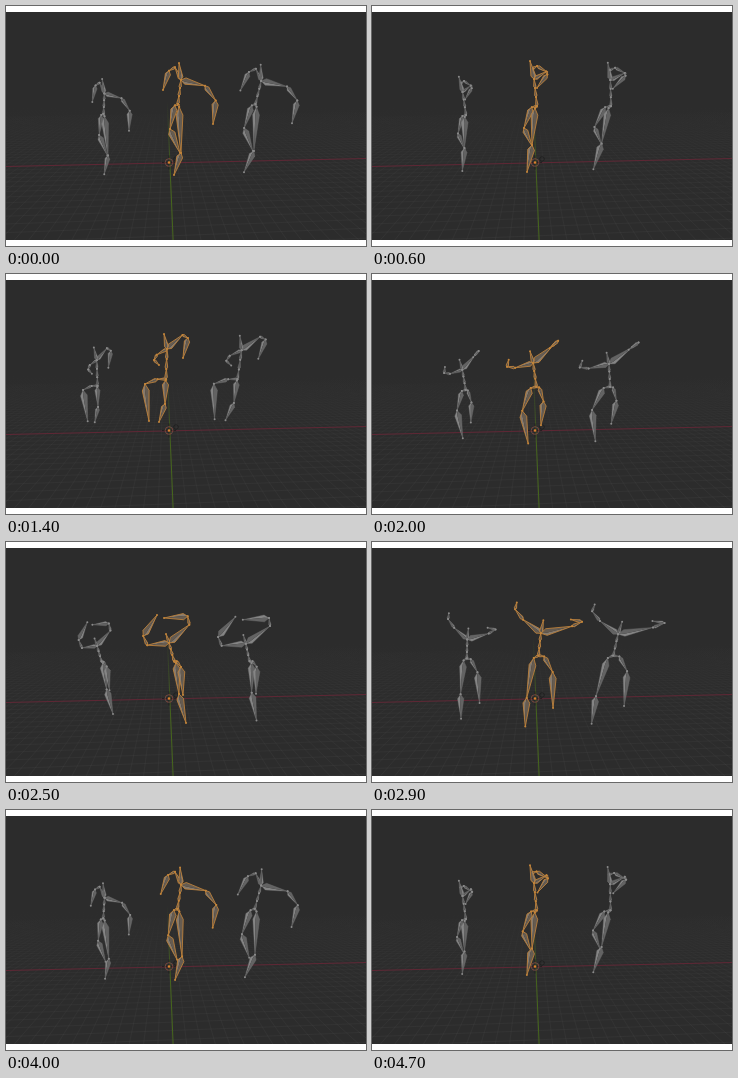
Animation, 360 px wide and 240 px high, one loop 4800 ms. Source, as an HTML page with a canvas:

```html
<!DOCTYPE html>
<html lang="en">
<head>
<meta charset="utf-8">
<title>Dancing armatures</title>
<style>
  html, body { margin: 0; width: 100%; height: 100%; overflow: hidden; background: #fff; }
  canvas { display: block; width: 360px; height: 240px; }
</style>
</head>
<body>
<canvas id="stage" width="360" height="240"></canvas>
<script>
const W = 360, H = 240, LOOP = 4800, STEP = 100, DANCE = 4050;
const ctx = document.getElementById('stage').getContext('2d');

// Key poses of one dancer. An arm is a bend handle and a hand, a leg a knee and a foot.
const poses = [
  { time: 0, pelvis: [172, 98], chest: [175, 74], head: [173, 57],
    arms: [[[166, 43], [157, 84]], [[221, 76], [207, 118]]],
    legs: [[[164, 123], [174, 147]], [[175, 147], [168, 169]]] },
  { time: 600, pelvis: [165, 100], chest: [162, 73], head: [158, 55],
    arms: [[[156, 51], [175, 66]], [[189, 54], [165, 82]]],
    legs: [[[152, 122], [160, 140]], [[160, 139], [155, 166]]] },
  { time: 1400, pelvis: [160, 105], chest: [161, 75], head: [158, 60],
    arms: [[[140, 84], [153, 91]], [[192, 41], [177, 84]]],
    legs: [[[139, 110], [143, 147]], [[159, 130], [153, 148]]] },
  { time: 2500, pelvis: [168, 119], chest: [163, 101], head: [160, 92],
    arms: [[[117, 113], [151, 73]], [[210, 66], [158, 76]]],
    legs: [[[173, 152], [180, 181]], [[175, 125], [177, 153]]] },
  { time: 3300, pelvis: [165, 108], chest: [177, 85], head: [188, 72],
    arms: [[[173, 51], [139, 56]], [[244, 102], [202, 117]]],
    legs: [[[130, 150], [121, 176]], [[183, 137], [181, 181]]] },
];

const GREY = { light: '#858585', dark: '#636363', edge: '#747474', joint: '#8a8a8a', width: 0.35 };
const ORANGE = { light: '#857a6e', dark: '#665c51', edge: '#c2843a', joint: '#c2843a', width: 0.85 };

// The same dance seen from three places on the floor.
const dancers = [
  { x: 95, y: 110, sway: 0.5, bob: 0.55, sx: 0.7, sy: 0.85, lean: 0.05, style: GREY },
  { x: 242, y: 102, sway: 1.5, bob: 1, sx: 1.1, sy: 0.96, lean: -0.1, style: GREY },
  { x: 167, y: 102, sway: 1, bob: 1, sx: 1, sy: 1, lean: 0, style: ORANGE },
];

const mix = (a, b, k) => a + (b - a) * k;
const mix2 = (a, b, k) => [mix(a[0], b[0], k), mix(a[1], b[1], k)];

// Swings a point around its root, the short way round.
function swing(rootA, a, rootB, b, root, k) {
  const ax = a[0] - rootA[0], ay = a[1] - rootA[1];
  const bx = b[0] - rootB[0], by = b[1] - rootB[1];
  const turn = Math.atan2(ax * by - ay * bx, ax * bx + ay * by);
  const angle = Math.atan2(ay, ax) + turn * k;
  const len = mix(Math.hypot(ax, ay), Math.hypot(bx, by), k);
  return [root[0] + len * Math.cos(angle), root[1] + len * Math.sin(angle)];
}

function bezier(a, c, b, t) {
  return mix2(mix2(a, c, t), mix2(c, b, t), t);
}

// Returns the pelvis and chains of joints for the whole body.
function bodyAt(time) {
  const phase = time % DANCE;
  const i = poses.findLastIndex(p => p.time <= phase);
  const a = poses[i], b = poses[(i + 1) % poses.length];
  const k = (phase - a.time) / ((b.time || DANCE) - a.time);
  const pelvis = mix2(a.pelvis, b.pelvis, k);
  const chest = swing(a.pelvis, a.chest, b.pelvis, b.chest, pelvis, k);
  const head = swing(a.chest, a.head, b.chest, b.head, chest, k);
  const arms = a.arms.map((arm, n) => {
    const [bend, hand] = arm.map((p, j) => swing(a.chest, p, b.chest, b.arms[n][j], chest, k));
    return [chest, bezier(chest, bend, hand, 1 / 3), bezier(chest, bend, hand, 2 / 3), hand];
  });
  const legs = a.legs.map(([kneeA, footA], n) => {
    const [kneeB, footB] = b.legs[n];
    const knee = swing(a.pelvis, kneeA, b.pelvis, kneeB, pelvis, k);
    const foot = swing(kneeA, footA, kneeB, footB, knee, k);
    const hip = [mix(pelvis[0], knee[0], 0.4), mix(pelvis[1], knee[1], 0.06)];
    return [pelvis, hip, knee, foot];
  });
  const spine = [0, 1 / 3, 2 / 3, 1].map(t => mix2(pelvis, chest, t));
  return { pelvis, chains: [...legs, ...arms, [chest, head], spine] };
}

function line(c, x1, y1, x2, y2, color, width) {
  c.strokeStyle = color;
  c.lineWidth = width;
  c.beginPath();
  c.moveTo(x1, y1);
  c.lineTo(x2, y2);
  c.stroke();
}

function circle(x, y, r) {
  ctx.beginPath();
  ctx.arc(x, y, r, 0, 7);
}

function dot(x, y, r, color) {
  circle(x, y, r);
  ctx.fillStyle = color;
  ctx.fill();
}

function makeFloor() {
  const canvas = document.createElement('canvas');
  canvas.width = W;
  canvas.height = H;
  const c = canvas.getContext('2d');
  c.fillStyle = '#fff';
  c.fillRect(0, 0, W, H);
  c.beginPath();
  c.rect(0, 6, W, 228);
  c.clip();
  c.fillStyle = '#2c2c2c';
  c.fillRect(0, 0, W, H);

  const vx = 160, vy = 60, ox = 163.5, oy = 157;
  const fade = c.createLinearGradient(0, 100, 0, 234);
  fade.addColorStop(0, 'rgba(76,76,76,0)');
  fade.addColorStop(0.4, 'rgba(76,76,76,.24)');
  fade.addColorStop(1, 'rgba(76,76,76,.36)');
  for (let n = -30; n < 16; n++) {
    const y = vy + (oy - vy) / (1 - n * 0.033), slope = (y - vy) / 4365;
    line(c, 0, y + ox * slope, W, y - (W - ox) * slope, fade, 0.6);
  }
  for (let n = -60; n <= 60; n++) {
    const x = ox + n * 8;
    line(c, vx, vy, vx + (x - vx) * 2, vy + (oy - vy) * 2, fade, 0.6);
  }
  line(c, 0, 160.5, W, 152.5, '#5f2735', 1);
  const green = c.createLinearGradient(0, 95, 0, 175);
  green.addColorStop(0, 'rgba(70,102,28,0)');
  green.addColorStop(1, '#46661c');
  line(c, 161.3, 95, 167.2, 236, green, 1);
  return canvas;
}

function drawCursor() {
  const x = 163, y = 156.5;
  line(ctx, x - 7, y, x + 7, y, '#1b1b1b', 0.7);
  line(ctx, x, y - 7, x, y + 7, '#1b1b1b', 0.7);
  circle(x, y, 3.8);
  ctx.strokeStyle = '#6b5a52';
  ctx.lineWidth = 0.8;
  ctx.stroke();
  ctx.setLineDash([1.7, 1.7]);
  ctx.strokeStyle = '#8a3429';
  ctx.stroke();
  ctx.setLineDash([]);
  circle(170, 153, 2.3);
  ctx.strokeStyle = '#1b1b1b';
  ctx.lineWidth = 0.7;
  ctx.stroke();
  dot(x, y, 1.3, '#d9822f');
}

function trace(points) {
  ctx.beginPath();
  points.forEach(p => ctx.lineTo(...p));
  ctx.closePath();
}

function face(points, color) {
  trace(points);
  ctx.fillStyle = color;
  ctx.fill();
}

function bone(a, b, style) {
  const dx = b[0] - a[0], dy = b[1] - a[1], len = Math.hypot(dx, dy);
  if (len < 1) return;
  const w = Math.min(3.4, Math.max(1.2, len * 0.13)) / len;
  const at = (along, side) => [a[0] + dx * along - dy * side, a[1] + dy * along + dx * side];
  const l = at(0.18, w), r = at(0.18, -w), m = at(0.18, w * 0.2);
  face([a, l, b, m], style.light);
  face([a, m, b, r], style.dark);
  trace([a, l, b, r]);
  ctx.strokeStyle = style.edge;
  ctx.lineWidth = style.width;
  ctx.lineJoin = 'round';
  ctx.stroke();
  dot(...a, 1, style.joint);
  dot(...b, 1, style.joint);
}

function drawDancer({ pelvis, chains }, d) {
  const rootX = d.x + d.sway * (pelvis[0] - 167);
  const rootY = d.y + d.bob * (pelvis[1] - 102);
  const place = ([px, py]) => {
    const x = px - pelvis[0], y = py - pelvis[1];
    return [rootX + x * d.sx + y * d.lean, rootY + y * d.sy];
  };
  for (const chain of chains) {
    const joints = chain.map(place);
    for (let i = 1; i < joints.length; i++) bone(joints[i - 1], joints[i], d.style);
  }
}

const floor = makeFloor();

function draw(time) {
  ctx.drawImage(floor, 0, 0);
  drawCursor();
  const body = bodyAt(time);
  dancers.forEach(d => drawDancer(body, d));
}

const start = performance.now();
function tick() {
  const t = (performance.now() - start) % LOOP;
  draw(Math.floor(t / STEP) * STEP);
  requestAnimationFrame(tick);
}
tick();
</script>
</body>
</html>
```
